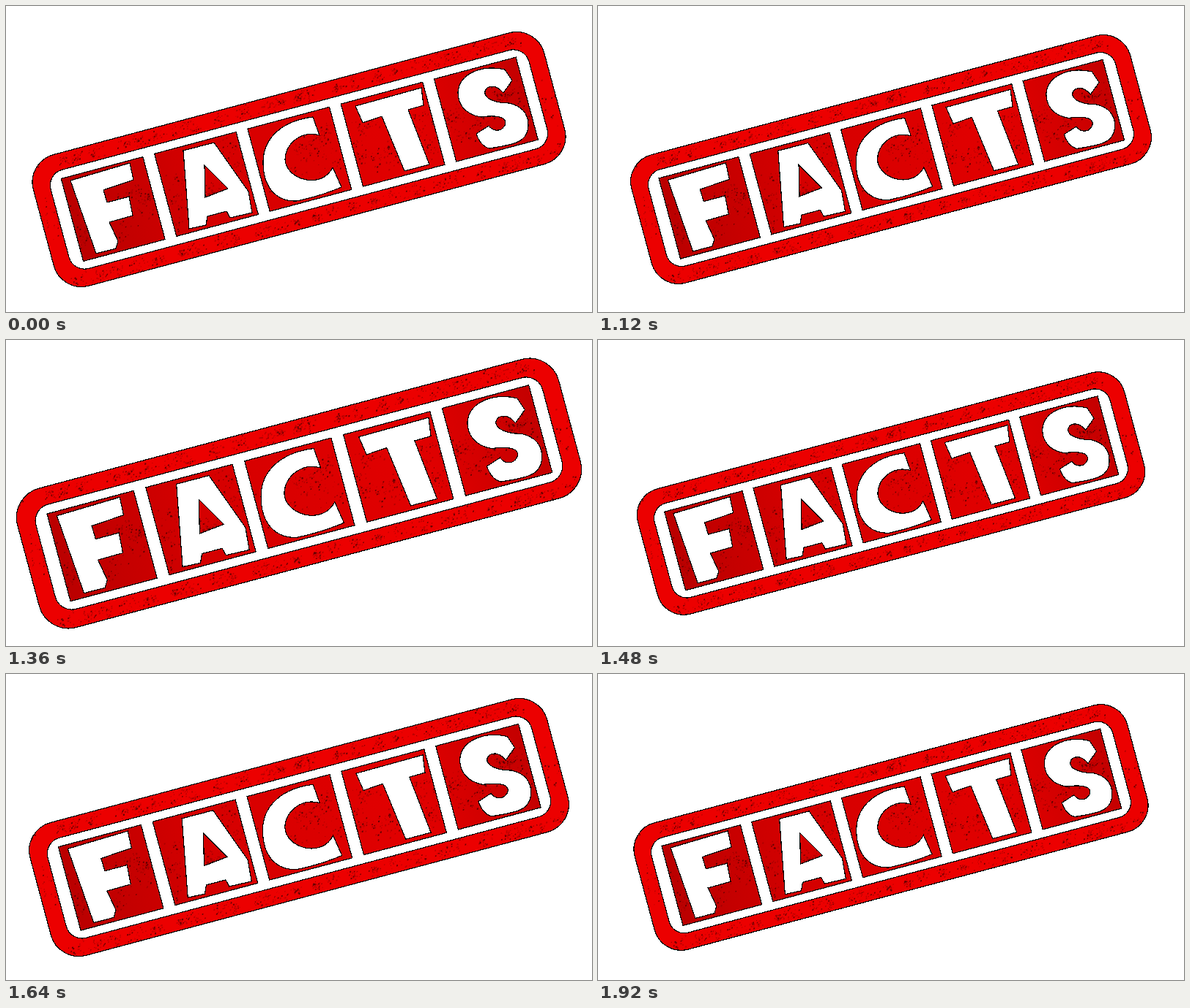
These frames come from a looping animation (800 by 419 pixels, 1.96 s). An HTML page:

```html
<!DOCTYPE html>
<html lang="en">
<head>
<meta charset="utf-8">
<title>Facts stamp</title>
<style>
  html, body { margin: 0; width: 100%; height: 100%; overflow: hidden; background: #fff; }
  svg { display: block; width: 100vw; height: 100vh; }
  .ink { stroke: #000; stroke-width: 1.2; vector-effect: non-scaling-stroke; shape-rendering: crispEdges; }
  .white { fill: #fff; fill-rule: evenodd; }
</style>
</head>
<body>
<svg viewBox="0 0 800 419" role="img" aria-label="FACTS">
  <defs>
    <clipPath id="inside"><rect x="-361" y="-93" width="722" height="186" rx="39"/></clipPath>
    <linearGradient id="shade">
      <stop offset="0" stop-color="#400" stop-opacity=".3"/>
      <stop offset=".3" stop-color="#400" stop-opacity=".14"/>
      <stop offset=".75" stop-color="#400" stop-opacity=".06"/>
      <stop offset="1" stop-color="#400" stop-opacity=".24"/>
    </linearGradient>
  </defs>
  <g id="stamp">
    <g transform="rotate(-15)">
      <rect class="ink" x="-361" y="-93" width="722" height="186" rx="39" fill="#ec0000"/>
      <rect x="-326" y="-64" width="652" height="128" fill="url(#shade)"/>
      <g clip-path="url(#inside)">
        <path id="faint" fill="#800" opacity=".5"/>
        <path id="dark" fill="#300" opacity=".7"/>
      </g>
      <path id="frame" class="ink white"/>
    </g>
    <g id="letters" transform="translate(-400 -210)"></g>
  </g>
</svg>
<script>
const byId = id => document.getElementById(id);

// White frame: a rounded plate with five evenly spaced windows
const CELL_COUNT = 5, CELL_PITCH = 131.8, CELL_WIDTH = 115.5, CELL_TOP = 58.5;
let frame = 'M-316-70H316a22 22 0 0 1 22 22V48a22 22 0 0 1-22 22H-316a22 22 0 0 1-22-22V-48a22 22 0 0 1 22-22Z';
for (let i = 0; i < CELL_COUNT; i++) {
  const left = -320.5 + i * CELL_PITCH;
  frame += `M${left} ${-CELL_TOP}h${CELL_WIDTH}V${CELL_TOP}h${-CELL_WIDTH}Z`;
}
byId('frame').setAttribute('d', frame);

// Hand-cut letters
const letters = {
  F: 'M88 239L169 215L174 238L133 252L138 269L168 261L173 287L141 296L153 322L150 332L123 339Z',
  A: 'M242 198L284 187L331 254L336 283L306 290L301 281L275 288L273 300L250 305Z' +
     'M271 218L272 262L303 250Z',
  C: 'M419 152L428 177C403 170 382 188 381 210C382 238 431 252 446 221L458 248' +
     'Q430 260 397 267C367 268 351 246 351 214C351 180 378 157 419 152Z',
  T: 'M477 137L567 112L570 136L549 142L578 217L544 226L513 151L487 160Z',
  S: 'M681 87L691 102L679 119Q668 106 657 112Q650 119 658 126Q668 133 687 133C708 138 713 150 713 163' +
     'C713 188 690 190 660 195Q648 192 642 175L659 164Q666 173 676 169Q686 161 679 154Q670 149 648 152' +
     'C625 148 617 133 617 118C619 92 650 80 681 87Z'
};
byId('letters').innerHTML = Object.values(letters)
  .map(d => `<path class="ink white" d="${d}"/>`).join('');

// Worn ink: seeded clumps of specks on the border and in the windows
let seed = 11;
const random = () => (seed = seed * 16807 % 2147483647) / 2147483647;
const scatter = () => random() + random() + random() - 1.5;
const specks = { faint: '', dark: '' };

function clump(x, y, spread, count) {
  for (let n = 0; n < count; n++) {
    const size = (0.6 + random() * 1.5).toFixed(1);
    const px = (x + scatter() * spread).toFixed(1);
    const py = (y + scatter() * spread * 0.7).toFixed(1);
    specks[n % 3 ? 'faint' : 'dark'] += `M${px} ${py}h${size}l-.6 ${size}h-${size}z`;
  }
}
for (let i = 0; i < 50; i++) {
  const side = i % 2 ? 1 : -1;
  clump(-345 + i * 14 + scatter() * 12, side * 82, 6 + random() * 12, 26);
  clump(-318 + i * 13, scatter() * 38, 10 + random() * 18, 30);
}
for (const side of [-1, 1]) clump(side * 349, side * 12, 40, 70);
for (const id in specks) byId(id).setAttribute('d', specks[id]);

// Still for a second, then 24 steps of a triangle wave: three pulses per 25 poses
const HOLD = 1000, STEP = 40, LOOP = 1960;
const REST_WIDTH = 728.67, PEAK_WIDTH = 772, SWING = 216.67;

function draw(time) {
  const t = time % LOOP;
  const pose = t < HOLD ? 0 : 1 + Math.floor((t - HOLD) / STEP);
  const phase = (pose - 10) * 3 / 25;
  const width = PEAK_WIDTH - SWING * Math.abs(phase - Math.round(phase));
  byId('stamp').setAttribute('transform', `translate(400 210) scale(${(width / REST_WIDTH).toFixed(5)})`);
}

const start = performance.now();
function tick() {
  draw(performance.now() - start);
  requestAnimationFrame(tick);
}
tick();
</script>
</body>
</html>
```
